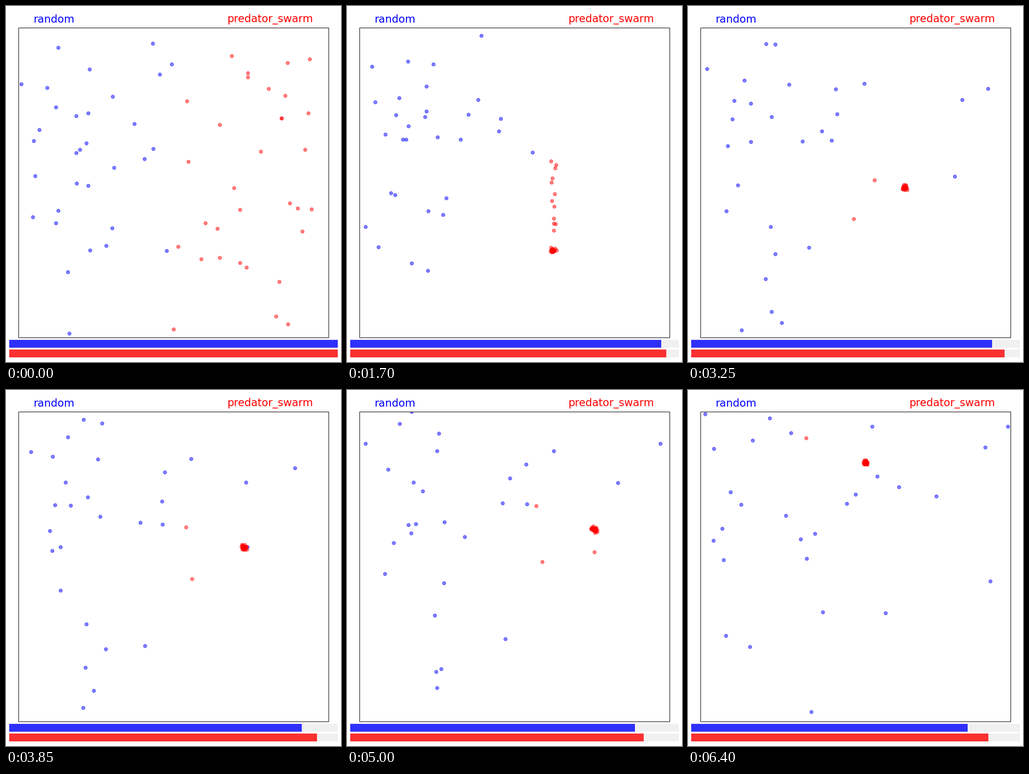
A matplotlib script that plays this animation: 726 px wide and 771 px high, repeating every 6450 ms.

```python
import numpy as np
import matplotlib.pyplot as plt
from matplotlib.animation import FuncAnimation
from matplotlib.patches import Rectangle

W, H, DPI = 726, 771, 64
PT = 72 / DPI                      # points per pixel
FRAMES, INTERVAL = 129, 50
LEFT, TOP, SIDE = 27.3, 46.7, 671.3
CORNER = np.array([LEFT, TOP])
TEAM = 32
STEP = 6.72                        # top red speed per axis, 1% of the arena
JITTER = 7

# Key steps, with the swarm centre and the bar lengths at each
KEYS = [0, 19, 34, 52, 77, 100, 128]
SWARM_X = [398, 400, 447, 424, 516, 536, 382]
SWARM_Y = [584, 580, 528, 447, 339, 302, 155]
BLUE_BAR = [711.5, 696, 673.5, 672.5, 633.5, 617, 599]
RED_BAR = [711.5, 690.5, 684.5, 691.5, 667, 636, 643.5]

# Stragglers hold an offset from the swarm: first step, last step, offset
STRAYS = [
    (36, 110, (-113, 70)),
    (60, FRAMES, (-126, -51)),
    (90, 110, (0, 49)),
]
LOSSES = (10, 25, 65, 90)          # steps at which blue loses a member


def swarm_centre(t):
    return np.array([np.interp(t, KEYS, SWARM_X), np.interp(t, KEYS, SWARM_Y)])


def start_points(rng, side):
    """Scatter a team over its half of the arena."""
    return CORNER + SIDE * rng.uniform((side / 2, 0), (side / 2 + 0.5, 1),
                                       (TEAM, 2))


def simulate_red(rng):
    pos = start_points(rng, 1)
    track = [pos.copy()]
    for t in range(1, FRAMES):
        centre = swarm_centre(t)
        lag = pos - centre
        fade = np.interp(t, [19, 34], [1, 0])
        # Early on the swarm closes in along a bent front
        bend = np.column_stack([0.12 * np.maximum(-lag[:, 1], 0),
                                -0.5 * np.maximum(lag[:, 0], 0)])
        goal = centre + fade * bend + rng.uniform(-JITTER, JITTER, pos.shape)
        for i, (first, last, offset) in enumerate(STRAYS):
            if first <= t <= last:
                goal[i] = centre + offset
            elif t > last:
                goal[i] = np.nan
        pos += np.clip(goal - pos, -STEP, STEP)
        track.append(pos.copy())
    return track


def simulate_blue(rng):
    pos = start_points(rng, 0)
    vel = rng.normal(0, 2.3, pos.shape)
    track = [pos.copy()]
    for t in range(1, FRAMES):
        vel = 0.97 * vel + rng.normal(0, 0.56, vel.shape)
        pos = (pos + vel - CORNER) % SIDE + CORNER
        if t in LOSSES:
            gap = np.hypot(*(pos - swarm_centre(t)).T)
            keep = np.arange(len(pos)) != gap.argmin()
            pos, vel = pos[keep], vel[keep]
        track.append(pos.copy())
    return track


blue_track = simulate_blue(np.random.default_rng(8))
red_track = simulate_red(np.random.default_rng(3))

plt.rcParams["font.family"] = "DejaVu Sans"
fig = plt.figure(figsize=(W / DPI, H / DPI), dpi=DPI, facecolor="white")
ax = fig.add_axes([0, 0, 1, 1])
ax.set_xlim(0, W)
ax.set_ylim(H, 0)
ax.axis("off")

arena = Rectangle(CORNER, SIDE, SIDE, fc="none", ec="black", lw=1.1 * PT,
                  zorder=5)
ax.add_patch(arena)


def make_dots(color):
    dots, = ax.plot([], [], "o", color=color, alpha=0.5, ms=7.4 * PT,
                    mew=1.1 * PT)
    dots.set_clip_path(arena)
    return dots


def make_bar(y, color):
    ax.add_patch(Rectangle((7, y), 711.5, 17.2, fc="#f0f0f0", lw=0))
    bar = Rectangle((7, y), 711.5, 17.2, fc=color, alpha=0.8, lw=0)
    return ax.add_patch(bar)


def make_label(x, y, text, color):
    ax.text(x, y, text, color=color, size=22.9 * PT, va="baseline")


make_label(59.7, 36, "random", "blue")
make_label(480, 35, "predator_swarm", "red")
blue_dots, red_dots = make_dots("blue"), make_dots("red")
blue_health, red_health = make_bar(723, "blue"), make_bar(743.8, "red")


def draw(i):
    blue_dots.set_data(*blue_track[i].T)
    red_dots.set_data(*red_track[i].T)
    blue_health.set_width(np.interp(i, KEYS, BLUE_BAR))
    red_health.set_width(np.interp(i, KEYS, RED_BAR))
    return blue_dots, red_dots, blue_health, red_health


anim = FuncAnimation(fig, draw, frames=FRAMES, interval=INTERVAL,
                     init_func=lambda: draw(0), repeat=True, repeat_delay=0)
plt.show()
```
